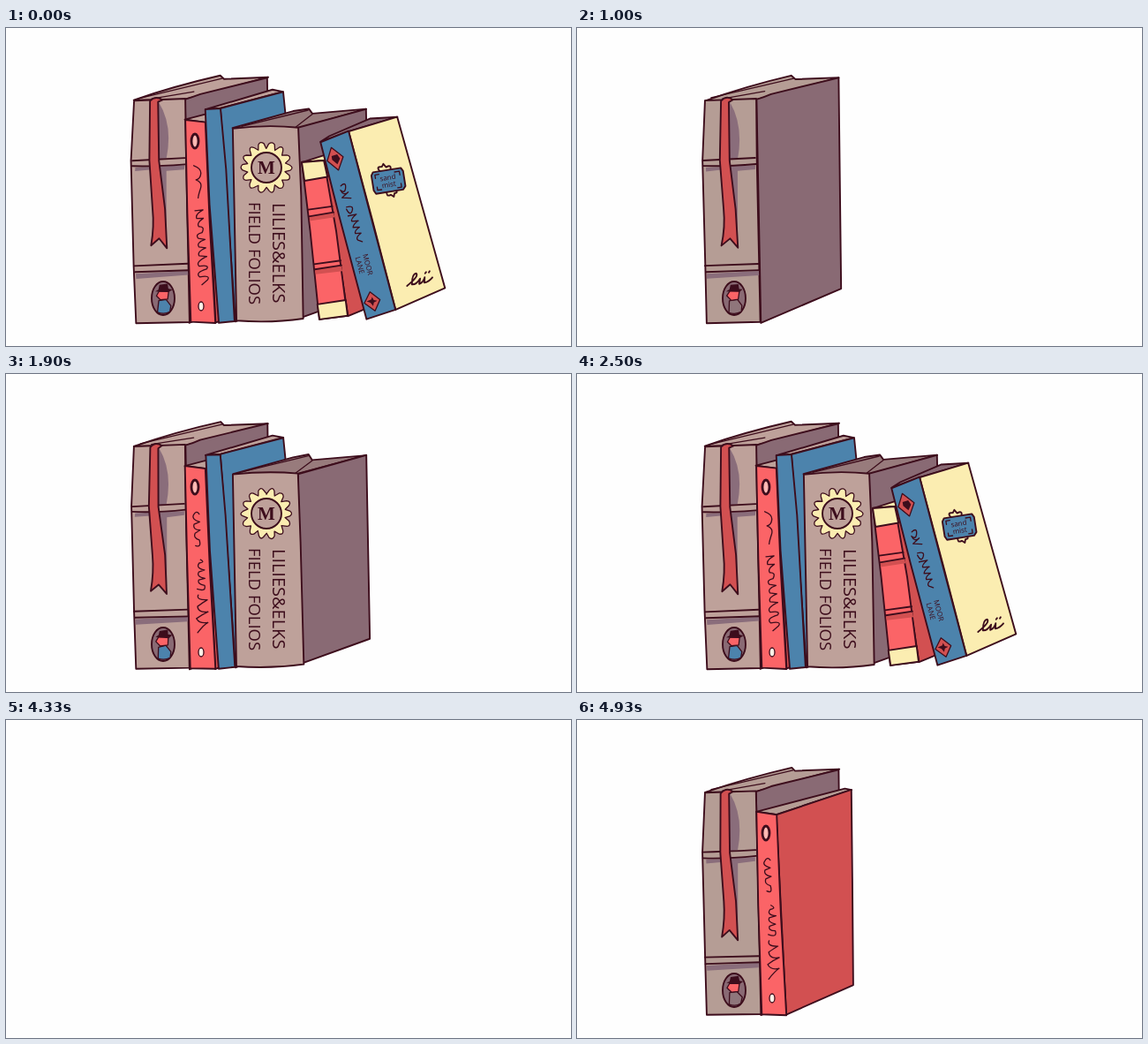
An HTML page that plays this animation: 640 by 360 pixels, repeating every 5230 ms.

```html
<!DOCTYPE html>
<html lang="en">
<head>
<meta charset="utf-8">
<title>Bookshelf</title>
<style>
  html, body { margin: 0; width: 100%; height: 100%; overflow: hidden; background: #fefefe; }
  svg { display: block; width: 100vw; height: 100vh; }
  .book { stroke: #3d0d1c; stroke-width: 1.9; stroke-linejoin: round; stroke-linecap: round; fill: none; }
  .tan { fill: var(--tan); }
  .blue { fill: var(--blue); }
  .brown { fill: #896a74; }
  .top { fill: #987b7c; }
  .red { fill: #fb6467; }
  .dark { fill: #d25051; }
  .cream { fill: #fbedb1; }
  .shade { fill: #8a6d7b; stroke: none; }
  .flat { stroke: none; }
  .ink { fill: #3d0d1c; stroke: none; }
  .thin { stroke-width: 1.3; }
  text { fill: #3d0d1c; stroke: none; font-family: "Open Sans", sans-serif; font-weight: 500; }
  .serif { font-family: "Liberation Serif", serif; font-weight: bold; }
</style>
</head>
<body>
<svg viewBox="0 0 640 360">

  <!-- tall tan book with ribbon -->
  <g class="book">
    <path class="tan" d="M145 82Q190 66 243 54L247 58 297 56 203 81Z"/>
    <path class="brown" d="M203 81Q212 78 220 75L296 56 299 295 208 334Z"/>
    <path class="thin" d="M165 80L213 72M152 79L245 57"/>
    <path class="tan" d="M145 82L203 80 204 150 208 333 147 334 145 270 142 150Z"/>
    <path class="shade" d="M173 84Q189 110 182 147L171 149ZM146 158L202 155 202 160 182 162V240L174 228 168 160 146 162ZM147 278L206 275 206 280 147 284Z"/>
    <path d="M143 150Q165 149 202 147M143 156Q170 157 203 154M145 269L206 267M146 276L207 274"/>
    <path class="dark" d="M163 83Q169 76 177 81L172 84 173 150 180 205 182 249 173 238 164 246Q168 225 166 205L162 150Z"/>
    <ellipse class="brown" cx="178" cy="306" rx="13" ry="19"/>
    <path class="thin" style="fill:var(--coat)" d="M172 322L173 309 181 307 187 314 186 321Q180 325 172 322Z"/>
    <path class="red thin" d="M173 298H184L183 307 175 308 170 303Z"/>
    <path class="ink" d="M169 298L173 296 174 291 183 290 184 295 188 296 184 299Z"/>
  </g>

  <!-- red book -->
  <g class="book">
    <path class="tan" d="M203 104L303 78 311 79 226 107Z"/>
    <path class="dark" d="M226 107L311 79 312 180 313 300 237 334Z"/>
    <path class="red" d="M203 104L226 107 231 220 237 334 209 333 205 210Z"/>
    <ellipse cx="214" cy="128" rx="4" ry="8" fill="#ffb9b4" stroke-width="2.8"/>
    <ellipse cx="221" cy="315" rx="3" ry="5" fill="#fff0e6" class="thin"/>
    <path id="script" class="thin" d=""/>
  </g>

  <!-- blue book -->
  <g class="book">
    <path class="tan" d="M226 92L302 70 314 72 243 91Z"/>
    <path class="blue" d="M243 91L314 72 327 200 334 298 260 332Z"/>
    <path class="blue" d="M226 92L243 91 249 160 259 332 241 334 231 200Z"/>
    <text class="serif" x="-18" y="8" font-size="23" transform="translate(290 165) rotate(-11)" letter-spacing="-1.2">1735</text>
    <path class="ink" d="M262 173l4-5 4 5-4 5ZM308 156l4-5 4 5-4 5Z"/>
    <path class="thin" d="M269 192Q275 186 277 191T283 187 289 189M294 185l2 3 3-5 2 4 3-6 2 4 4-5 1 3 3-2"/>
  </g>

  <!-- wide tan volume -->
  <g class="book">
    <path class="top" d="M257 113L325 94 343 91 347 97 408 92 331 113Z"/>
    <path class="brown" d="M331 113L408 92 412 300 334 328Z"/>
    <path class="thin" d="M328 112L347 98M267 111L342 93"/>
    <path class="tan" d="M257 114Q295 109 331 113L334 190 337 329Q300 334 261 331L259 220Z"/>
    <path id="star" class="cream thin"/>
    <circle class="tan" cx="295" cy="158" r="17"/>
    <text class="serif" x="295" y="165" font-size="21" text-anchor="middle">M</text>
    <text font-size="20" transform="translate(302 198) rotate(90)">LILIES&amp;ELKS</text>
    <text font-size="18.5" transform="translate(275 197) rotate(90)">FIELD FOLIOS</text>
  </g>

  <!-- small banded book -->
  <g class="book">
    <path class="cream" d="M335 152L405 130 425 132 360 150Z"/>
    <path class="dark" d="M360 150L425 132 447 302 387 326Z"/>
    <path class="red" d="M335 152L360 150 374 230 387 326 355 330 345 230Z"/>
    <path class="dark flat" d="M344 213L371 209 372 214 344 219ZM350 273L380 269 381 275 351 279Z"/>
    <path class="cream" d="M335 152L360 150 364 169 338 173ZM353 313L385 308 387 326 355 330Z"/>
    <path d="M342 206L370 202M343 213L371 209M349 267L379 263M350 273L380 269"/>
  </g>

  <!-- leaning cream book -->
  <g class="book">
    <path class="brown" d="M356 129L366 122 412 103 443 101 388 117Z"/>
    <path class="cream" d="M388 117L443 101 470 198 497 294 441 319 414 215Z"/>
    <path class="blue" d="M356 129L388 117 414 215 441 319 408 330 378 214Z"/>
    <path class="dark thin" d="M368 135L382 146 377 161 364 150ZM412 299L424 307 418 320 406 311Z"/>
    <path class="ink" d="M369 145l6-2 3 5-3 7-6-5ZM415 304l2 4 4 1-4 2-1 4-3-4-4-1 5-2Z"/>
    <path class="thin" d="M379 179Q385 173 385 181T379 184Q382 191 388 186L381 192 391 193M386 203Q394 200 392 207T386 205M388 213L397 211Q390 216 392 219L399 218Q393 222 393 226L400 225Q394 230 396 233L402 232Q395 237 399 240L404 242"/>
    <g transform="translate(402 257) rotate(75)">
      <text font-size="8" y="-2">MOOR</text><text font-size="8" x="1" y="7">LANE</text>
    </g>
    <g transform="translate(433 173) rotate(-9)">
      <path d="M-7-12Q-12-18-5-17L-3-20 0-16Q7-18 4-12M-4 12Q-5 18 0 16L3 19 5 15Q10 15 6 11"/>
      <path class="blue" d="M-16-12H16L18-8V9L15 12H-16L-18 8V-9Z"/>
      <path class="thin" d="M-14-5V-9H-9M14 5V9H9M14-5V-9H9M-14 5V9H-9"/>
      <text font-size="8" font-weight="bold" text-anchor="middle" y="-1">sand</text>
      <text font-size="8" font-weight="bold" text-anchor="middle" y="7">mist</text>
    </g>
    <path d="M454 292Q468 281 465 278Q460 278 460 290Q465 291 469 284L468 290Q473 288 474 282L474 288Q479 287 483 282M475 278l1-1M479 277l1-1"/>
  </g>
</svg>
<script>
const $ = id => document.getElementById(id);
const books = document.querySelectorAll('.book');
const LOOP = 5230;

// [start ms, books on show, seed of the line wobble]
const steps = [
  [0, 6, 1], [700, 0, 1], [1000, 1, 2], [1300, 2, 3], [1600, 3, 4], [1900, 4, 5],
  [2200, 5, 6], [2500, 6, 1], [2800, 6, 2], [3000, 6, 3], [3200, 6, 4], [3400, 6, 5],
  [3630, 6, 1], [4330, 0, 1], [4630, 1, 2], [4930, 2, 3]
];

const upward = 'M217 293Q224 284 229 281Q219 283 216 277Q223 272 229 269Q218 271 217 263Q224 258 228 256Q215 256 218 250' +
  'M217 243Q227 247 225 239Q216 238 218 233L225 231Q215 229 218 224L225 222Q214 220 219 214Q226 213 220 210' +
  'M215 194Q222 197 219 188Q212 186 214 180L220 177Q211 176 213 170L219 167Q210 165 212 160Q216 154 219 159';
const downward = 'M213 156Q221 159 221 165T215 172Q223 174 220 182T218 192' +
  'M214 207L223 206Q214 211 216 216L224 215Q215 221 218 225Q226 224 222 232Q214 234 218 238L225 239' +
  'Q215 243 219 248L226 249Q216 253 219 258L227 259Q214 265 219 270Q231 268 227 273Q214 277 219 282Q232 280 228 285L222 291';

// Ring of round petals
const PETALS = 14;
const polar = (r, i) => {
  const a = i * 2 * Math.PI / PETALS;
  return [295 + r * Math.sin(a), 158 - r * Math.cos(a)].map(v => v.toFixed(1)).join(' ');
};
let star = 'M' + polar(22, 0);
for (let i = 0; i < PETALS; i++) {
  star += `L${polar(27, i + .25)}Q${polar(31, i + .5)} ${polar(27, i + .75)}L${polar(22, i + 1)}`;
}
$('star').setAttribute('d', star + 'Z');

const paths = [...document.querySelectorAll('path')].map(el => ({ el, d: el.getAttribute('d') }));
const script = paths.find(p => p.el.id === 'script');

// Shift every path coordinate a little, the same way for the same seed
function wobble(seed) {
  let n = seed * 1000;
  const rand = () => {
    const v = Math.sin(++n * 12.9898) * 43758.5453;
    return v - Math.floor(v);
  };
  for (const { el, d } of paths) {
    el.setAttribute('d', d.replace(/-?\d+(\.\d+)?/g, v => (+v + (rand() - .5) * .9).toFixed(2)));
  }
}

let shown;
function draw(now) {
  const t = now % LOOP;
  const step = steps.findLast(s => s[0] <= t);
  if (step !== shown) {
    shown = step;
    const [, count, seed] = step;
    const css = document.documentElement.style;
    books.forEach((b, i) => b.style.display = i < count ? '' : 'none');
    css.setProperty('--tan', count > 3 ? '#bea19a' : '#b59d95');
    css.setProperty('--blue', count > 3 ? '#4c83ac' : '#5585ad');
    css.setProperty('--coat', count > 2 ? '#4c83ac' : '#8f767b');
    script.d = count === 6 ? downward : upward;
    wobble(seed);
  }
  requestAnimationFrame(draw);
}
draw(0);
</script>
</body>
</html>
```
